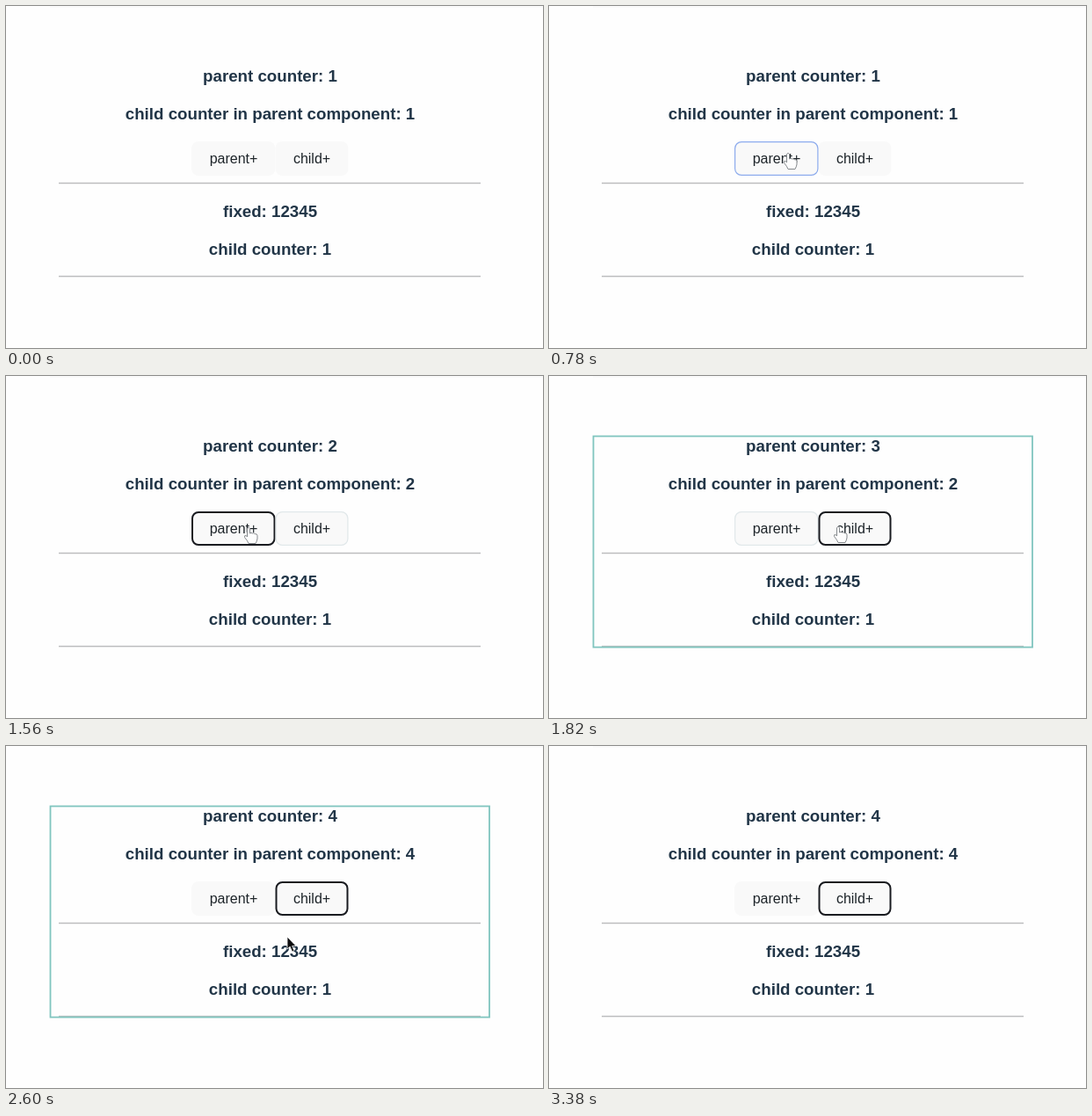
Recreate the animation shown at these times as an HTML page. Size 611 px wide and 389 px high, loop 3510 ms.

```html
<!DOCTYPE html>
<html lang="en">
<head>
<meta charset="utf-8">
<title>Counters</title>
<style>
  html, body { margin: 0; width: 100%; height: 100%; overflow: hidden; background: #fefefe; }
  svg { display: block; width: 611px; height: 389px; }
  text { font-family: "Liberation Sans", Arial, sans-serif; text-anchor: middle; fill: #213547; }
  .title { font-size: 18.72px; font-weight: bold; }
  .label { font-size: 16px; fill: #1d2429; }
</style>
</head>
<body>
<svg viewBox="0 0 611 389">
  <rect width="611" height="389" fill="#fefefe"/>
  <rect x="50" width="561" height="2" fill="#fafafa"/>
  <text id="parentText" class="title" x="300.5" y="85.5"></text>
  <text id="childText" class="title" x="300.5" y="128.5"></text>
  <g id="buttons">
    <rect x="211" y="154" width="95.5" height="39" rx="8" fill="#f9f9f9"/>
    <rect x="306.5" y="154" width="83" height="39" rx="8" fill="#f9f9f9"/>
  </g>
  <rect id="parentEdge" fill="none"/>
  <rect id="childEdge" fill="none"/>
  <text class="label" x="259" y="179">parent+</text>
  <text class="label" x="348" y="179">child+</text>
  <path d="M60 201.5H540M60 307.5H540" stroke="#bcbdbe" stroke-width="1.7"/>
  <text class="title" x="300.5" y="240">fixed: 12345</text>
  <text class="title" x="300.5" y="283">child counter: 1</text>
  <rect id="flash" x="50.5" y="68.5" width="499.5" height="240" fill="none" stroke="#80c5bf" stroke-width="1.8"/>
  <path id="hand" fill="#fdfdfd" stroke="#85898d" stroke-width="1" stroke-linejoin="round"
    d="M-1.5 1.5Q0 -1 1.5 1.5V7Q3 5.500 4.500 7Q6 6 7.300 7.700Q9.500 7 10 9.500V13Q9.500 16 8 18.500H0Q-1 15.500 -4.500 11.500Q-5 9 -2.800 9.500L-1.500 11Z"/>
  <path id="arrow" fill="#0c0c0e" stroke="#fff" stroke-width=".8" d="M0 0V14L3.200 11.200L5.600 17L8 16L5.600 10.500H10Z"/>
</svg>
<script>
const STEP = 130, STEPS = 27;
const $ = id => document.getElementById(id);

// Pointer stops: step, x, y
const stops = [
  [1, 330, 347], [3, 290, 225], [4, 278, 180], [6, 272, 167], [7, 272, 167],
  [9, 340, 176], [10, 340, 176], [12, 276, 172], [13, 275, 172], [14, 329, 171],
  [15, 335, 174], [16, 275, 172], [17, 275, 172], [18, 348, 176], [19, 348, 176],
  [20, 320, 217], [22, 142, 308], [23, 95, 372]
];
const clicks = { parent: [7, 13, 17], child: [10, 15, 19] };
const focusChanges = [[7, "parent"], [9, "child"], [12, "parent"], [14, "child"], [16, "parent"], [19, "child"]];
const flashes = [[7, 8], [10, 11], [13, 15], [17, 20]];
const boxes = { parent: [211, 95.5], child: [306.5, 83] };

function pointer(step) {
  const i = stops.findIndex(s => s[0] >= step);
  if (i < 0 || step < stops[0][0]) return null;
  const b = stops[i], a = stops[i - 1] || b;
  const k = a === b ? 1 : (step - a[0]) / (b[0] - a[0]);
  return [a[1] + (b[1] - a[1]) * k, a[2] + (b[2] - a[2]) * k];
}

function hovered(step) {
  const p = pointer(step);
  if (!p || p[1] < 154 || p[1] > 193) return "";
  return Object.keys(boxes).find(n => p[0] >= boxes[n][0] && p[0] < boxes[n][0] + boxes[n][1]) || "";
}

function edge(name, step, focus) {
  const over = n => hovered(step - n) === name;
  let color = "none", width = 1.2;
  if (focus === name) { color = "#191b20"; width = 2; }
  else if (over(0)) color = over(1) ? "#8cabed" : "#b4cde8";
  else if (over(1) || over(2)) color = "#e1e8ea";
  const [x, w] = boxes[name], inset = width / 2;
  const attrs = { x: x + inset, y: 154 + inset, width: w - width, height: 39 - width, rx: 8 - inset, stroke: color, "stroke-width": width };
  for (const key in attrs) $(name + "Edge").setAttribute(key, attrs[key]);
}

function show(el, on) { el.setAttribute("visibility", on ? "visible" : "hidden"); }

function draw(step) {
  const count = name => 1 + clicks[name].filter(c => c <= step).length;
  $("parentText").textContent = "parent counter: " + count("parent");
  $("childText").textContent = "child counter in parent component: " + count("child");

  const focus = focusChanges.filter(f => f[0] <= step).map(f => f[1]).pop();
  edge("parent", step, focus);
  edge("child", step, focus);
  show($("flash"), flashes.some(([a, b]) => step >= a && step <= b));

  const p = pointer(step), onButton = hovered(step) !== "";
  show($("hand"), p && onButton);
  show($("arrow"), p && !onButton);
  if (p) $(onButton ? "hand" : "arrow").setAttribute("transform", `translate(${p})`);
}

let last = -1;
function tick() {
  const step = Math.floor(performance.now() / STEP) % STEPS;
  if (step !== last) draw(last = step);
  requestAnimationFrame(tick);
}
tick();
</script>
</body>
</html>
```
